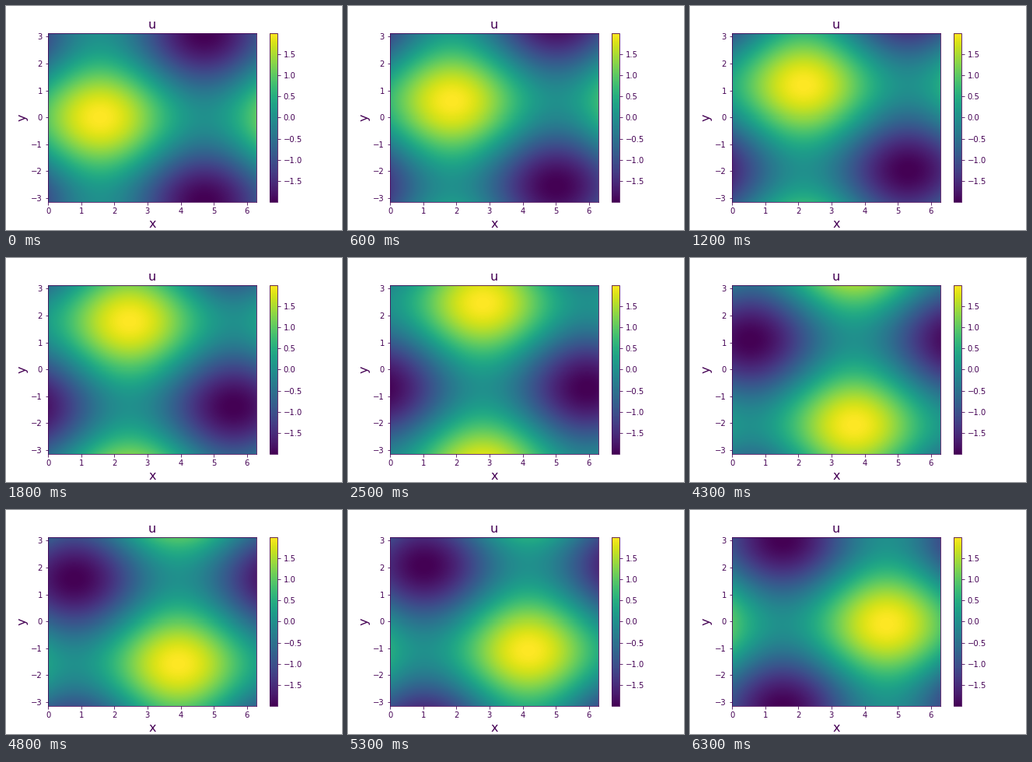
Recreate the animation shown at these times as a matplotlib script. Size 432 by 288 pixels, loop 6400 ms.

```python
import numpy as np
import matplotlib.pyplot as plt
from matplotlib.animation import FuncAnimation

FRAMES = 64
INTERVAL = 100
INK = "#440154"
PEAK = 1.995

plt.rcParams.update({
    "font.family": "DejaVu Sans",
    "font.size": 10,
    "text.color": INK,
    "axes.labelcolor": INK,
    "axes.edgecolor": INK,
    "xtick.color": INK,
    "ytick.color": INK,
})

fig = plt.figure(figsize=(6, 4), dpi=72, facecolor="white")
fig.subplots_adjust(left=0.125, right=0.9, bottom=0.125, top=0.88)
ax = fig.add_subplot()


def centers(start, stop, count):
    """Midpoints of equal cells between start and stop."""
    step = (stop - start) / count
    return start + step * (np.arange(count) + 0.5)


x = centers(0, 2 * np.pi, 268)
y = centers(-np.pi, np.pi, 217)[:, None]


def wave(i):
    t = 2 * np.pi * i / FRAMES
    return np.sin(x - t / 2) + np.cos(y - t)


image = ax.imshow(wave(0), cmap="viridis", vmin=-PEAK, vmax=PEAK,
                  origin="lower", aspect="auto", interpolation="nearest",
                  extent=(0, 2 * np.pi, -np.pi, np.pi))
ax.set_xticks(range(7))
ax.set_yticks(range(-3, 4))
ax.set_title("u", fontsize=16)
ax.set_xlabel("x", fontsize=16)
ax.set_ylabel("y", fontsize=16)

bar = fig.colorbar(image, ax=ax, ticks=np.arange(-1.5, 1.6, 0.5))
bar.outline.set_edgecolor(INK)


def update(i):
    image.set_data(wave(i))
    return (image,)


anim = FuncAnimation(fig, update, frames=FRAMES, interval=INTERVAL,
                     repeat=True, repeat_delay=0)
plt.show()
```
